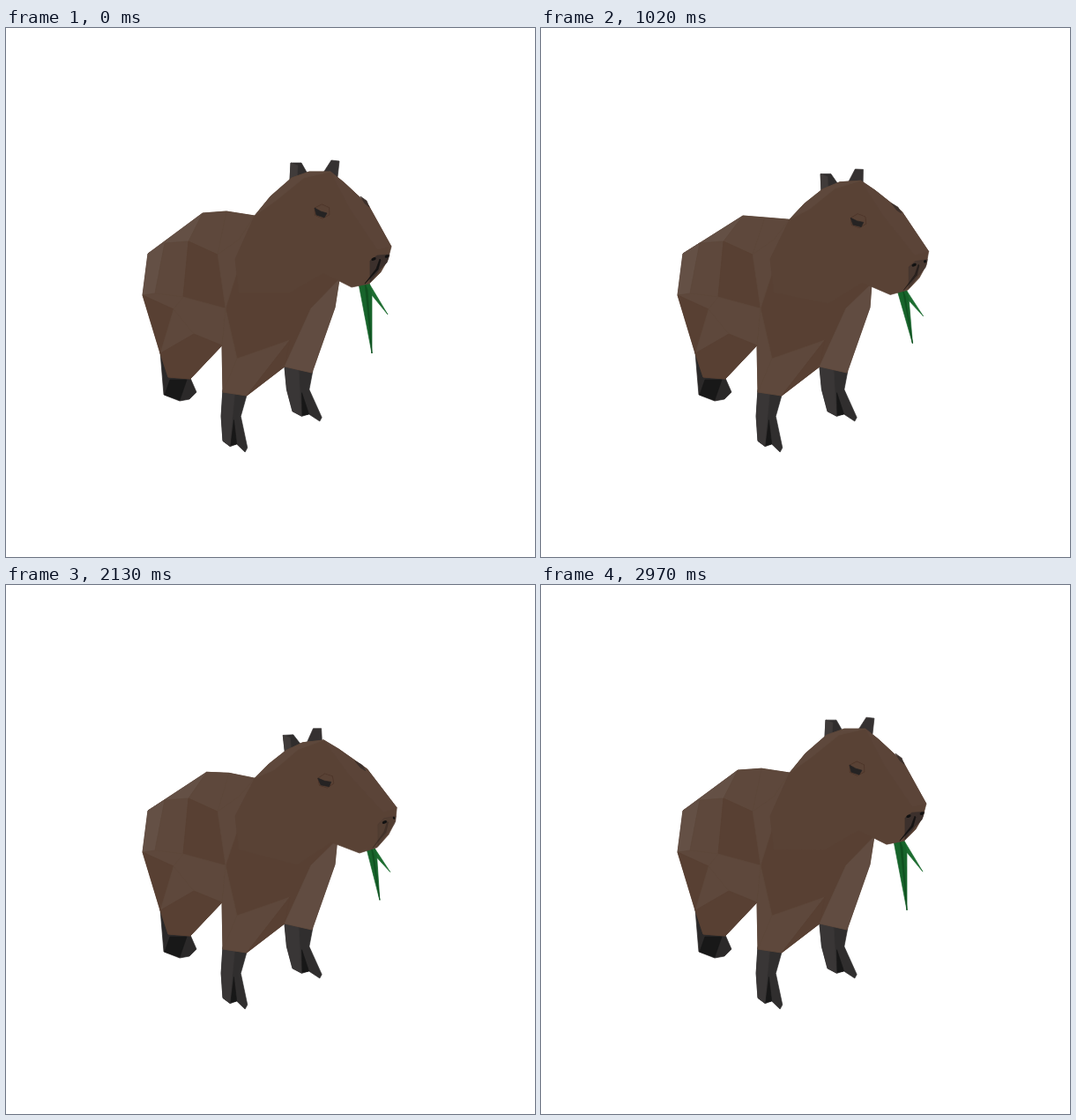
An HTML page with a canvas for the animation above (3000 ms loop, 600 by 600 pixels).

```html
<!DOCTYPE html>
<html lang="en">
<head>
<meta charset="utf-8">
<title>Capybara</title>
<style>
html, body { margin: 0; height: 100%; overflow: hidden; background: #fff; }
canvas { display: block; width: 600px; height: 600px; }
</style>
</head>
<body>
<canvas id="stage" width="600" height="600"></canvas>
<script>
const ctx = document.getElementById('stage').getContext('2d');
const LOOP = 3000, STEP = 30;
const clamp = x => Math.max(0, Math.min(1, x));
const ramp = (t, a, b) => clamp((t - a) / (b - a));
const ease = x => x * x * (3 - 2 * x);
const mix = (a, b, k) => a + (b - a) * k;
const fur = light => `rgb(${88 + 6 * light},${64 + 8 * light},${51 + 9 * light})`;

let sink, turn; // head lowering and head turning, 0..1

function poly(color, points) {
  ctx.beginPath();
  for (const [x, y] of points) ctx.lineTo(x, y);
  ctx.closePath();
  ctx.fillStyle = ctx.strokeStyle = color;
  ctx.lineWidth = 0.7;
  ctx.lineJoin = 'round';
  ctx.fill();
  ctx.stroke();
}

// Moves a head point; the neck follows less, depth adds parallax to the turn
function place([x, y], depth = 0) {
  const follow = ramp(x, 266, 326);
  const dx = Math.min(12, 0.21 * (y - 160) - 10) + depth;
  const dy = 22 - 0.155 * (x - 325);
  return [x + follow * mix(-2 * sink, dx, turn), y + follow * mix(6 * sink, dy, turn)];
}
const headPart = (color, points, depth) => poly(color, points.map(p => place(p, depth)));

// One cloven foot, in units of its width and height
function foot(x, y, w, h, lean) {
  const part = (color, points) =>
    poly(color, points.map(([u, v]) => [x + u * w + v * lean, y + v * h]));
  part('#302e2e', [[0, -.02], [1, .08], [.75, .42], [1.03, .93], [.93, 1], [.58, .87], [.3, .91], [0, .82], [-.07, .42]]);
  part('#393636', [[0, 0], [.5, .05], [.4, .45], [.3, .9], [0, .82], [-.07, .42]]);
  part('#171717', [[.46, .48], [.58, .87], [.33, .89]]);
}

function legs() {
  poly('#2b2929', [[175, 368], [184, 395], [209, 397], [216, 413], [208, 421], [197, 423], [179, 416]]);
  poly('#181818', [[186, 399], [180, 416], [197, 422], [205, 399]]);
  foot(316, 384, 31, 62, 11);
  foot(246, 411, 27, 70, 0);
}

// Corners of the body mesh
const mesh = {
  a: [161, 256], e: [180, 244], f: [207, 242], g: [240, 257], h: [264, 240],
  i: [155, 303], j: [169, 301], k: [201, 305], l: [249, 318],
  m: [175, 369], n: [190, 319], o: [213, 347], p: [245, 360], q: [209, 398], r: [184, 396],
  s: [246, 413], t: [273, 417], u: [316, 384], v: [347, 391], w: [373, 317],
  y: [340, 215], z: [346, 318], A: [262, 375], B: [322, 354]
};
// Corner names of each facet, then its lightness
const facets = 'abcdyxwvutspqrmi0 abfe2 bcgf1 cdhg1 aeji2 efkj1 fglk0 ghdl1 ' +
  'ijkn1 inm0 nklpo1 mnop1 mopqr0 lAsp1 AstB1 tBu0 xwvuz1.5';

function body() {
  mesh.b = [223 + 6 * sink, 210 + 3 * sink];
  mesh.c = [250 + 4 * sink, 208 + 7 * sink];
  mesh.d = place([282, 213]);
  mesh.x = [378 - 3 * sink, 285 + 5 * sink];
  for (const facet of facets.split(' ')) {
    const [, names, light] = facet.match(/([a-zA-Z]+)(.+)/);
    poly(fur(+light), [...names].map(n => mesh[n]));
  }
}

function head() {
  const brow = [[282, 213], [300, 191], [324, 170], [344, 163], [368, 163]];
  const face = [[383, 175], [411, 201], [437, 248]];
  const jaw = [[433, 263], [425, 277], [412, 290], [392, 294], [360, 278]];
  const neck = [[322, 300], [264, 300], [260, 262]];
  headPart(fur(0.2), [...brow, ...face, ...jaw, ...neck]);
  headPart(fur(1), [...brow, [338, 170], [306, 196]]);
  headPart(fur(0.5), [brow[4], ...face, [421, 251], [390, 205]]);
  headPart('#3c302b', [[402, 191], [409, 196], [412, 203], [407, 199]], -4);
}

function ears() {
  headPart('#302d2d', [[323, 153], [335, 153], [343, 167], [337, 172], [322, 173]]);
  headPart('#403b3a', [[323, 153], [331, 156], [330, 170], [322, 173]]);
  headPart('#353131', [[360, 164], [369, 150], [378, 151], [376, 169], [368, 165]], -14);
}

function eye(shut) {
  const lid = r => Array.from({ length: 6 }, (_, i) =>
    [358.5 + r * Math.cos(i * Math.PI / 3 + .5), 208 + .85 * r * Math.sin(i * Math.PI / 3 + .5)]);
  headPart('#4a3126', lid(9.5), 6);
  headPart(fur(0.2), lid(8.8), 6);
  if (shut > 0.95) return;
  const droop = y => mix(y, 214, shut);
  headPart('#252323', [[350, droop(204)], [357, droop(208)], [364, droop(210)], [361, 215], [352, 212]], 6);
}

function nostril(point, depth, r) {
  const [x, y] = place(point, depth);
  ctx.beginPath();
  ctx.ellipse(x, y, r, 1.6, -0.4, 0, 7);
  ctx.fillStyle = '#111';
  ctx.fill();
}

function snout() {
  ctx.globalAlpha = 1 - turn;
  headPart('#3c302c', [[413, 264], [421, 258], [435, 257], [432, 266], [424, 274], [413, 288]]);
  headPart('#151313', [[424, 262], [425, 263], [422, 274], [407, 290], [420, 273]]);
  ctx.globalAlpha = 1;
  nostril([417, 262], 5, 2.8);
  nostril([432, 259], 0, mix(2.4, 0.8, turn));
}

function leaf() {
  const [x, y] = place([400, 290]);
  const size = 1 - 0.28 * turn;
  const at = (u, v) => [x + u * size, y + v * size];
  const longTip = [x + 15 + 4 * sink - 4 * turn, y + 79 - 13 * sink - 14 * turn];
  const shortTip = [x + 33 - 8 * turn, y + 35 - 2 * sink - 9 * turn];
  poly('#1c6c30', [at(7, -1), at(12, 0), shortTip, at(15, 13)]);
  poly('#17642b', [at(0, 0), at(12, 0), at(15, 13), longTip]);
  poly('#105020', [at(7, -1), at(10, 7), longTip]);
}

function frame(now) {
  const t = Math.floor(now % LOOP / STEP) * STEP;
  sink = ramp(t, 0, 780) * (1 - ramp(t, 1860, 3000));
  turn = ease(ramp(t, 840, 1230)) * (1 - ease(ramp(t, 2010, 2400)));
  const shut = ramp(t, 660, 750) * (1 - ramp(t, 810, 930));

  ctx.fillStyle = '#fff';
  ctx.fillRect(0, 0, 600, 600);
  legs();
  body();
  leaf();
  ears();
  head();
  eye(shut);
  snout();
  requestAnimationFrame(frame);
}
requestAnimationFrame(frame);
</script>
</body>
</html>
```
